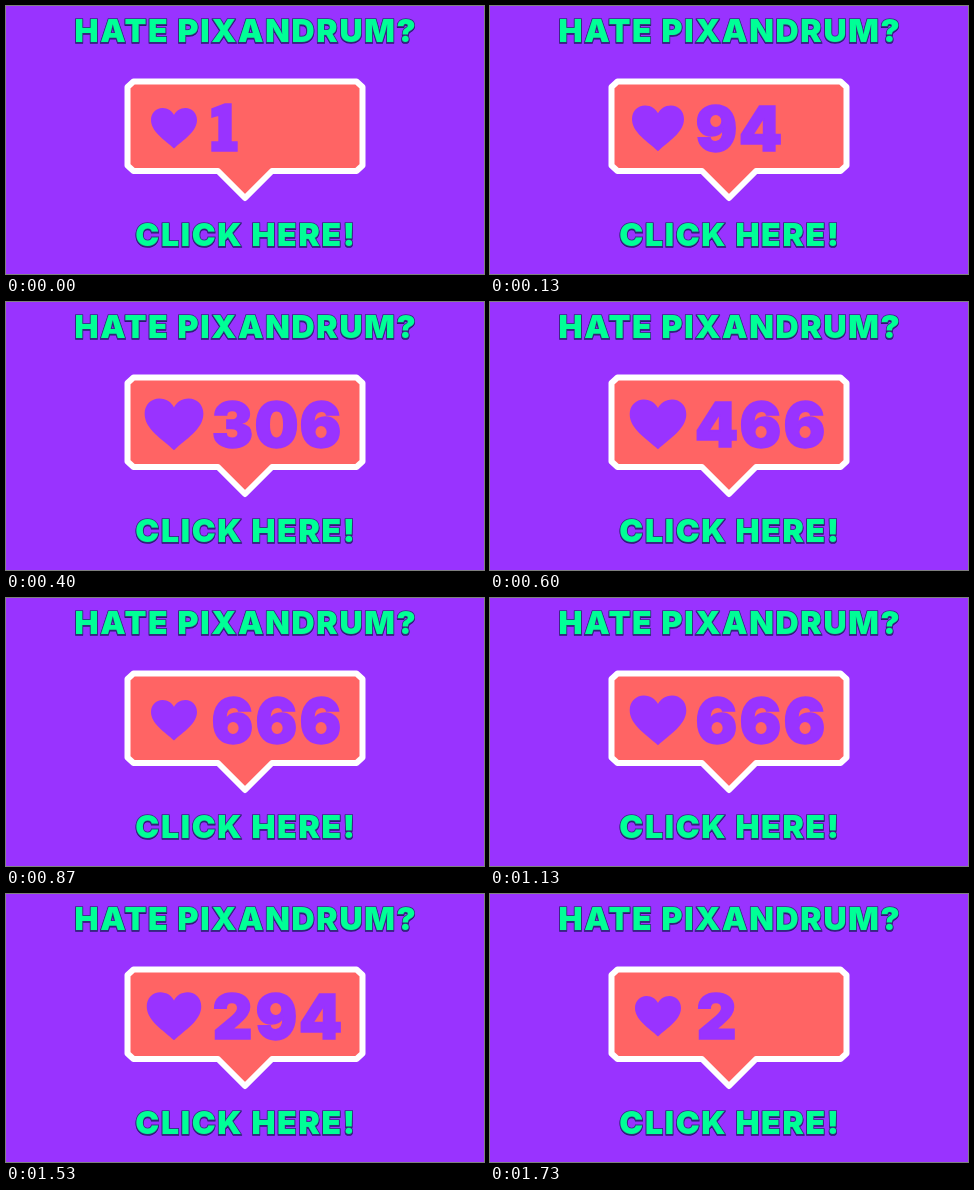
An HTML page that plays this animation: 478 by 268 pixels, repeating every 1790 ms.

```html
<!DOCTYPE html>
<html lang="en">
<head>
<meta charset="utf-8">
<title>Like counter</title>
<style>
  html, body { margin: 0; width: 100%; height: 100%; overflow: hidden; background: #93f; }
  svg { display: block; width: 100vw; height: 100vh; }
  text { font-family: Inter, "Open Sans", sans-serif; font-weight: 900; text-anchor: middle; }
  .label {
    font-size: 32px; letter-spacing: 1.7px; fill: #00ff96;
    stroke: #3c2a86; stroke-width: 1.6px; paint-order: stroke;
    filter: drop-shadow(.7px 1px .4px #24206b);
  }
  #count { font-size: 62px; stroke: #93f; stroke-width: 1.4px; }
</style>
</head>
<body>
<svg viewBox="0 0 478 268">
  <text class="label" x="240" y="36">HATE PIXANDRUM?</text>
  <path fill="#ff6464" stroke="#fff" stroke-width="6" stroke-linejoin="round"
    d="M127.5 75.5H350.5L356.5 81V159.5L350.5 165H266L239 192L212 165H127.5L121.5 159.5V81Z"/>
  <g fill="#93f">
    <path id="heart" d="M0 20.5C-9 12-23 4-23-8C-23-15-18-20-11.5-20C-6-20-2-17 0-13C2-17 6-20 11.5-20C18-20 23-15 23-8C23 4 9 12 0 20.5Z"/>
    <g id="count"></g>
  </g>
  <text class="label" x="240" y="240">CLICK HERE!</text>
</svg>
<script>
  const LOOP = 1790, BEAT = 13, TOP = 666;
  const heart = document.getElementById("heart");
  const count = document.getElementById("count");

  // The picture steps at 15 fps, on whole hundredths of a second.
  const stepAt = t => Math.floor((Math.floor(t / 10) + 0.5) * 0.15);

  // Climbs steadily, holds at the top, then drops almost twice as fast.
  function valueAt(step) {
    const up = 1 + 53.2 * (step - 0.25);
    const down = 2 + 97.4 * (26 - step);
    return Math.floor(Math.max(1, Math.min(up, TOP, down)));
  }

  // The "1" has a slab foot and is narrower than the other digits.
  function digits(value) {
    let x = 205;
    return [...String(value)].map(d => {
      const left = x;
      x += d === "1" ? 28 : 44;
      return d === "1"
        ? `<path transform="translate(${left} 98)" d="M1 5L14 0H20V38H26V47H1V38H8V11L1 13Z"/>`
        : `<text x="${left + 21.5}" y="144.5">${d}</text>`;
    }).join("");
  }

  function draw(now) {
    const step = stepAt(now % LOOP);
    const pulse = Math.abs(Math.sin(Math.PI * step / BEAT));
    heart.setAttribute("transform", `translate(168 122) scale(${1 + 0.28 * pulse})`);
    count.innerHTML = digits(valueAt(step));
  }

  const start = performance.now();
  function tick() {
    draw(performance.now() - start);
    requestAnimationFrame(tick);
  }
  tick();
</script>
</body>
</html>
```
